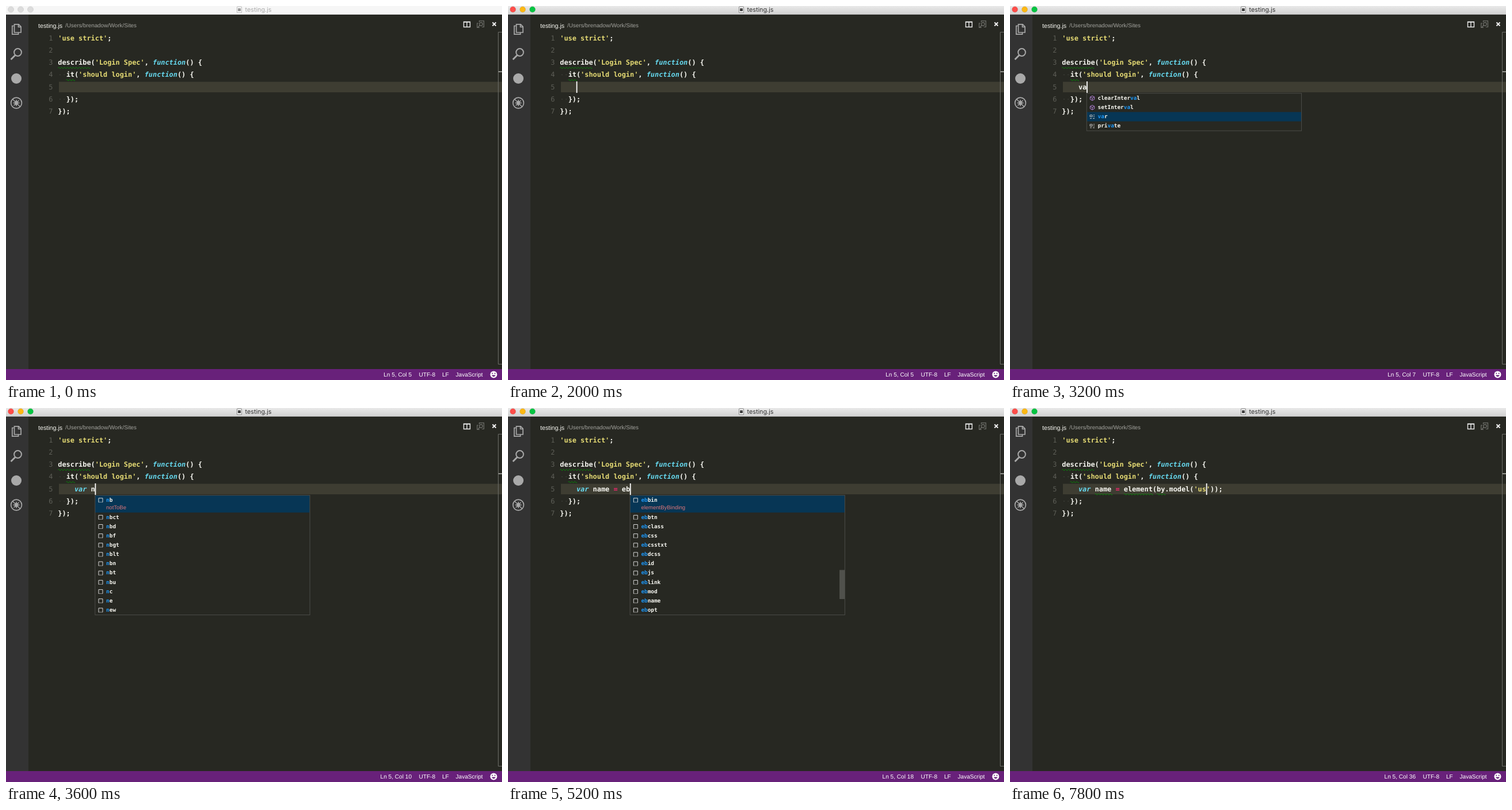
An HTML page that plays this animation: 862x650 px, repeating every 8 s.

```html
<!DOCTYPE html>
<html lang="en">
<head>
<meta charset="utf-8">
<title>Editor typing</title>
<style>
  html, body { margin: 0; width: 100%; height: 100%; overflow: hidden; background: #272822; }
  svg { display: block; width: 100vw; height: 100vh; }
  text { text-rendering: geometricPrecision; fill: #f8f8f2; font-family: "Liberation Sans", Arial, sans-serif; }
  .code { font: bold 11.9px "DejaVu Sans Mono", monospace; }
  .number { font: 11.9px "DejaVu Sans Mono", monospace; fill: #5d5e57; text-anchor: end; }
  .item { font: bold 9.4px "DejaVu Sans Mono", monospace; }
  .detail { font-size: 9.5px; fill: #dc767a; }
  .title { font: 10.8px Inter, sans-serif; }
  .status { font-size: 10.1px; fill: #fff; }
  .string { fill: #e6db74; }
  .keyword { fill: #66d9ef; font-style: italic; }
  .operator { fill: #f92672; }
  .match { fill: #1c96f5; }
  .squiggle { fill: none; stroke: #079107; stroke-width: 1; }
  .line { fill: none; stroke: #a9a9a9; stroke-width: 1.7; }
</style>
</head>
<body>
<svg viewBox="0 0 862 650">
  <defs>
    <linearGradient id="bar" x2="0" y2="1">
      <stop stop-color="#e9e9e9"/><stop offset="1" stop-color="#d0d0d0"/>
    </linearGradient>
    <g id="m" fill="none" stroke="#b180d7" stroke-width="1">
      <path d="M0-4 3.7-2V2L0 4-3.7 2V-2ZM-3.7-2 0 0 3.7-2M0 0V4"/>
    </g>
    <g id="f">
      <path d="M-4-.5 1-3.2 4.2-1.5V1.5L-1 4-4 2.3Z" fill="#75beff"/>
      <path d="M-3.6-.3-1 1 3.8-1.4" fill="none" stroke="#2b5f8c" stroke-width=".8"/>
    </g>
    <g id="i" fill="none" stroke="#75beff" stroke-width="1.4">
      <path d="M-5 0H1"/><circle cx="3" r="2.1"/><circle cx="-5" r="1" fill="#75beff"/>
    </g>
    <path id="k" d="M-4-3H0M2-3H4M-4 0H0M2 0H4M-4 3H-1M1 3H4M-4-3V0H0V-3" fill="none" stroke="#c5c5c5"/>
    <g id="s" fill="none" stroke="#d8d8d8">
      <path d="M-3.5 3.5V-3.5H3.5V3.5"/><path d="M-3.5 3.5H4" stroke-dasharray="1.5 1"/>
    </g>
  </defs>

  <rect width="862" height="650" fill="#272822"/>
  <g id="titlebar"></g>

  <!-- Activity bar -->
  <rect y="15" width="39" height="616" fill="#333"/>
  <g class="line">
    <path d="M13.5 34.5H10.8V49.2H21.5V46.5M14.5 31.8H22L26 35.8V46H14.5ZM21.5 32V36.5H26"/>
    <circle cx="20.5" cy="80.5" r="6.4" stroke-width="2"/>
    <path d="M16 85.5 8.5 93" stroke-width="2.8"/>
    <circle cx="18" cy="168.5" r="9.4"/>
    <path d="M11.5 162 24.500 175M18 163V174M12.500 168.500H23.500M13.500 173 22.500 164" stroke-width="1.4"/>
  </g>
  <circle cx="18" cy="126" r="9" fill="#a9a9a9"/>
  <ellipse cx="18" cy="168.500" rx="2.800" ry="3.800" fill="#a9a9a9"/>

  <!-- Editor header -->
  <text x="56" y="37.600" font-size="10.7">testing.js</text>
  <text x="103" y="37.400" font-size="9.8" style="fill:#a2a29d">/Users/brenadow/Work/Sites</text>
  <path d="M795.5 27.500H806.500V36.500H795.500ZM801 27V37M795 28H807" fill="none" stroke="#e8e8e8" stroke-width="1.400"/>
  <g fill="none" stroke="#70716c" stroke-width="1.200">
    <path d="M822.500 28V25.800H830.500V36.500H827M821 30H818.800V37.500H823"/>
    <circle cx="825.500" cy="31.500" r="2.800"/><path d="M823.500 33.500 819.500 37.500"/>
  </g>
  <path d="M845.500 28.500 851.500 34.500M851.500 28.500 845.500 34.500" stroke="#eee" stroke-width="2"/>

  <rect x="92" y="131.700" width="770" height="18.300" fill="#3e3d32"/>
  <path d="M862 45.500H855.500V622.500H862" fill="none" stroke="#6c6d68"/>
  <rect x="856" y="113.500" width="6" height="1.500" fill="#b5b5b0"/>
  <g id="code"></g>

  <!-- Status bar -->
  <rect y="631" width="862" height="19" fill="#68217a"/>
  <text class="status" id="position" x="705" y="644.200" text-anchor="end"></text>
  <text class="status" x="717.500" y="644.200">UTF-8</text>
  <text class="status" x="758" y="644.200">LF</text>
  <text class="status" x="781.500" y="644.200">JavaScript</text>
  <circle cx="847.500" cy="640.500" r="6" fill="#fff"/>
  <path d="M844 641.500Q847.500 647 851 641.500Z" fill="#68217a"/>
  <circle cx="845.300" cy="638.500" r="1.100" fill="#68217a"/>
  <circle cx="849.700" cy="638.500" r="1.100" fill="#68217a"/>

  <g id="typing"></g>
</svg>
<script>
const LOOP = 8000, LEFT = 90.3, CHAR = 7.165, ROW = 16.15, DETAIL = 13.5;
const FOCUS = 2000, MENU_START = 3000, LINT = 7000, RESUME = 7800;
const SNIPPET = "var name = element(by.model('";

const steps = [
  [0, ''], [2800, 'v'], [3200, 'va'], [3400, 'var '], [3600, 'var n'], [3800, 'var na'],
  [4000, 'var nam'], [4200, 'var name'], [4400, 'var name '], [4600, 'var name ='],
  [4800, 'var name = '], [5000, 'var name = e'], [5200, 'var name = eb'],
  [5400, 'var name = ebm'], [5600, 'var name = ebmo'], [5800, 'var name = ebmod'],
  [6200, SNIPPET], [RESUME, SNIPPET + 'us'],
];

// Suggestions as kind:label; a bare label is a snippet.
const suggestions = {
  v: 'm:removeEventListener m:clearInterval m:setInterval f:onpointerleave f:onpointermove f:onpointerover ' +
     'i:NativeHandler i:VBArray i:VBArrayConstructor k:var k:void k:private',
  n: 'nb nbct nbd nbf nbgt nblt nbn nbt nbu nc ne new f:name f:navigator',
  e: 'ebbin ebbtn ebclass ebcss ebcsstxt ebdcss ebid ebjs eblink ebmod ebname ebopt',
};
const details = { nb: 'notToBe', ebbin: 'elementByBinding', ebmod: 'elementByModel' };

const byId = id => document.getElementById(id);
const colX = col => LEFT + col * CHAR;
const baseline = line => 59.6 + 21.25 * (line - 1);
const text = (x, y, cls, content) => `<text x="${x}" y="${y}" class="${cls}">${content}</text>`;
const rect = (x, y, w, h, attrs) => `<rect x="${x}" y="${y}" width="${w}" height="${h}" ${attrs}/>`;

function codeText(line, col, source) {
  const marked = source.replace(/('[^']*')|\b(function|var)\b|(=)/g, (token, string, keyword) =>
    `<tspan class="${string ? 'string' : keyword ? 'keyword' : 'operator'}">${token}</tspan>`);
  return text(colX(col), baseline(line), 'code', marked);
}

function squiggle(line, col, length) {
  const waves = 'q1.275-2.6 2.55 0t2.55 0'.repeat(Math.round(length * CHAR / 5.1));
  return `<path class="squiggle" d="M${colX(col)} ${baseline(line) + 5.5}${waves}"/>`;
}

function indentDots(line) {
  return [0.5, 1.5].map(col => rect(colX(col) - .6, baseline(line) - 4.5, 1.3, 1.3, 'fill="#4a4b45"')).join('');
}

function titlebar(active) {
  const lights = ['#ff4d49', '#fdb813', '#06c441'].map((color, i) =>
    `<circle cx="${8.5 + 17 * i}" cy="6" r="5" fill="${active ? color : '#dcdcdc'}"
      stroke="${active ? '#0002' : '#cdcdcd'}" stroke-width=".7"/>`).join('');
  const ink = active ? '#333' : '#aaa';
  return rect(0, 0, 862, 15, `fill="${active ? 'url(#bar)' : '#f6f6f6'}"`) +
    rect(0, 14.3, 862, .7, `fill="${active ? '#b4b4b4' : '#dadada'}"`) + lights +
    `<path d="M401.500 1.500H409.500V11.500H401.500Z" fill="#fff" stroke="${active ? '#888' : '#bbb'}"/>` +
    rect(403, 4, 5, 5, `fill="${active ? '#444' : '#999'}"`) +
    `<text class="title" x="415.500" y="10.200" style="fill:${ink}">testing.js</text>`;
}

function popup(word, x) {
  const items = suggestions[word[0]].split(' ')
    .map(entry => entry.includes(':') ? entry.split(':') : ['s', entry])
    .filter(([, label]) => label.toLowerCase().includes(word)).slice(0, 12);
  const selected = Math.max(0, items.findIndex(([, label]) => label === 'var'));
  let y = 152, rows = '';
  items.forEach(([kind, label], i) => {
    const detail = i === selected && details[label];
    const height = ROW + (detail ? DETAIL : 0);
    const at = label.toLowerCase().indexOf(word), end = at + word.length;
    if (i === selected) rows += rect(x, y, 373, height, 'fill="#073655"');
    rows += `<use href="#${kind}" x="${x + 9.7}" y="${y + 8.2}"/>` +
      text(x + 19.3, y + 10.9, 'item',
        `${label.slice(0, at)}<tspan class="match">${label.slice(at, end)}</tspan>${label.slice(end)}`);
    if (detail) rows += text(x + 19.3, y + 24.4, 'detail', detail);
    y += height;
  });
  if (word === 'e' || word === 'eb') rows += rect(x + 364, 281.5, 9, 50.5, 'fill="#50514c"');
  return rect(x, 151.7, 373.3, y - 151.4, 'fill="#272822"') + rows +
    rect(x, 151.7, 373.3, y - 151.4, 'fill="none" stroke="#4c4d49"');
}

function typing(t, typed) {
  const x = colX(4 + typed.length);
  const expanded = typed.startsWith(SNIPPET);
  const word = (typed.match(/\w+$/) || [''])[0];
  let out = codeText(5, 4, typed + (expanded ? "'));" : ''));
  if (t >= LINT) out += squiggle(5, 8, 4) + squiggle(5, 15, 7) + squiggle(5, 23, 2);
  if (t >= FOCUS && (t < LINT || t >= RESUME)) out += rect(x - .3, 131, 1.8, 20, 'fill="#fff"');
  if (word && !expanded && t >= MENU_START) out += popup(word, x);
  return out;
}

byId('code').innerHTML =
  [1, 2, 3, 4, 5, 6, 7].map(n => text(81.5, baseline(n), 'number', n)).join('') +
  codeText(1, 0, "'use strict';") +
  codeText(3, 0, "describe('Login Spec', function() {") + squiggle(3, 0, 8) +
  codeText(4, 2, "it('should login', function() {") + squiggle(4, 2, 2) +
  codeText(6, 2, '});') + codeText(7, 0, '});') + indentDots(4) + indentDots(6);

const changes = [...new Set([...steps.map(([time]) => time), FOCUS, MENU_START, LINT])].sort((a, b) => a - b);
let shown = -1;

function draw() {
  const now = performance.now() % LOOP;
  const t = changes.filter(time => time <= now).pop();
  if (t !== shown) {
    shown = t;
    const typed = steps.filter(([time]) => time <= t).pop()[1];
    byId('titlebar').innerHTML = titlebar(t >= FOCUS);
    byId('typing').innerHTML = typing(t, typed);
    byId('position').textContent = `Ln 5, Col ${5 + typed.length}`;
  }
  requestAnimationFrame(draw);
}
draw();
</script>
</body>
</html>
```
